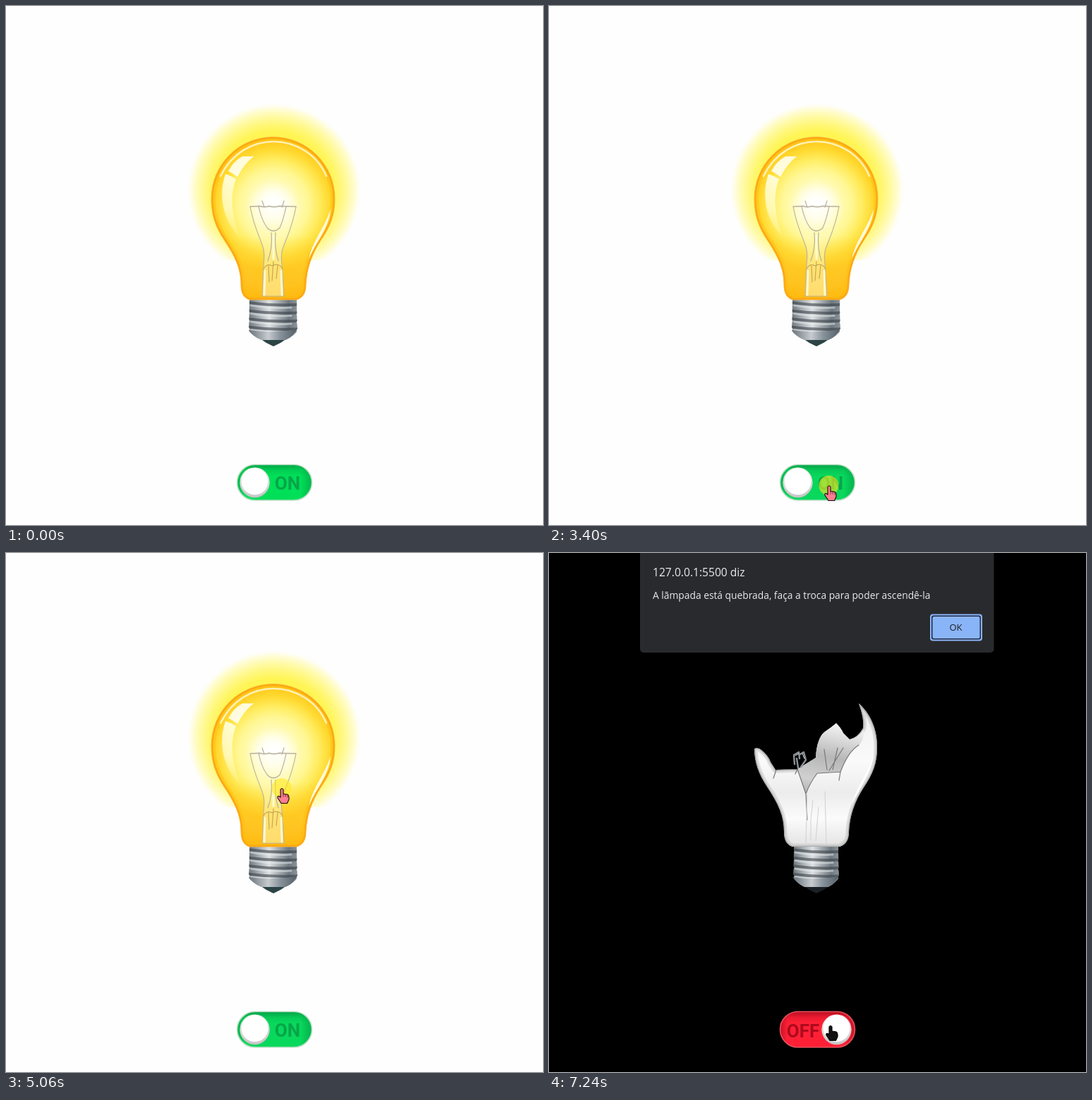
These frames come from a looping animation (761 by 735 pixels, 8000 ms). An HTML page with a canvas:

```html
<!DOCTYPE html>
<html lang="pt">
<head>
<meta charset="utf-8">
<title>Lâmpada</title>
<style>
html, body { margin: 0; width: 100%; height: 100%; overflow: hidden; background: #fefefe; }
canvas { display: block; }
</style>
</head>
<body>
<canvas id="stage" width="761" height="735"></canvas>
<script>
const ctx = document.getElementById('stage').getContext('2d');
const LOOP = 8000;
const start = performance.now();

const neck = 'C333 372 325 355 309 331 C297 313 291 296 291 273';
const foot = 'C425 406 421 413 412 416 L345 416 C336 413 333 405 333 395';
const glass = new Path2D(`M333 395 ${neck} A87.5 87.5 0 0 1 466 273 C466 297 459 313 446 332 C433 352 426 372 425 395 ${foot} Z`);
const shard = new Path2D('M333 395 C333 372 325 355 309 331 C297 313 291 296 291 277 Q297 275 301 279 Q311 287 314 296 L321 307 L352 306 L378 290 C379 270 384 258 391 253 Q400 247 407 241 Q414 248 417 255 L426 264 Q438 261 445 248 Q447 235 439 213 C455 227 466 250 465 277 C465 297 459 313 446 332 C433 352 426 372 425 395 ' + foot + ' Z');
const backWall = new Path2D('M352 306 L378 290 C379 270 384 258 391 253 Q400 247 407 241 Q414 248 417 255 L426 264 Q438 262 446 250 Q447 265 439 272 Q424 281 413 310 L380 312 Q370 325 364 341 Z');
const cracks = new Path2D('M321 307 L352 306 L364 341 Q370 325 380 312 L413 310 Q424 281 439 272 M364 341 L366 378 M352 306 L349 313 M322 307 L318 319 M413 310 L411 322 M390 278 L394 307 M409 276 L402 307 M417 276 L397 308');
const hand = new Path2D('M-2 2 Q0 -1 2 2 L2 8 L8 9 Q10 10 10 13 L10 16 L7.5 21.5 L-1 21.5 L-6 14 Q-7 10 -3 12 L-2 13 Z');
const arrow = new Path2D('M0 0 L0 16 L4 12.5 L6.5 18.5 L9 17.5 L6.5 11.5 L11.5 11.5 Z');
const stem = new Path2D('M346 284 C351 312 360 328 364 341 Q367 350 365 366 L363 411 L394 411 L391 366 Q389 350 393 341 C398 328 406 312 411 284 Z');
const wires = new Path2D('M346 284 L360 283 Q366 287 373 283 Q380 287 387 283 L411 284 M358 284 Q362 303 370 314 Q379 323 388 314 Q393 303 397 284 M363 276 L366 285 M394 276 L391 285 M376 321 Q378 343 371 361 M382 321 Q380 343 386 361');
const posts = new Path2D('M365 372 Q370 364 377 368 Q386 363 392 372 M372 368 L373 391 M379 362 L377 389 M385 367 L383 386');

function fill(shape, style) { ctx.fillStyle = style; ctx.fill(shape); }
function line(shape, style, width) {
  ctx.strokeStyle = style;
  ctx.lineWidth = width;
  ctx.stroke(shape);
}
function blend(g, stops) {
  for (const [at, color] of stops) g.addColorStop(at, color);
  return g;
}
const radial = (x, y, r, stops) => blend(ctx.createRadialGradient(x, y, 0, x, y, r), stops);
const linear = (x0, y0, x1, y1, stops) => blend(ctx.createLinearGradient(x0, y0, x1, y1), stops);
function box(x, y, w, h, r) {
  const p = new Path2D();
  p.roundRect(x, y, w, h, r);
  return p;
}
function disc(x, y, r) {
  const p = new Path2D();
  p.arc(x, y, r, 0, 7);
  return p;
}
function text(s, x, y, font, color, align = 'left') {
  ctx.font = font;
  ctx.fillStyle = color;
  ctx.textAlign = align;
  ctx.fillText(s, x, y);
}

function drawBase(on) {
  const l = on ? 344 : 346, r = on ? 413 : 411;
  const body = new Path2D(`M${l + 1} 415 L${r - 1} 415 L${r} 460 Q${r - 4} 467 396 473 L362 473 Q${l + 4} 467 ${l} 460 Z`);
  fill(new Path2D('M360 471 L398 471 Q389 478 379 482 Q369 478 360 471 Z'), on ? '#2c4446' : '#1b2024');
  ctx.save();
  ctx.clip(body);
  fill(body, linear(l, 0, r, 0, [[0, '#6f777d'], [.2, '#a5abb0'], [.42, '#dfe2e4'], [.6, '#a9b0b5'], [.82, '#6f787f'], [1, '#8c959b']]));
  for (let i = 0; i < 4; i++) {
    const y = 419 + i * 11.5;
    line(new Path2D(`M${l - 2} ${y + 1} Q379 ${y + 6} ${r + 2} ${y + 4}`), 'rgba(58,66,73,.6)', 4);
    line(new Path2D(`M${l + 3} ${y + 5} Q376 ${y + 10} ${r - 9} ${y + 8}`), 'rgba(236,239,241,.5)', 3);
  }
  fill(new Path2D(`M${l} 459 Q379 464 ${r} 458 L398 475 L360 475 Z`), linear(l, 0, r, 0, [[0, '#68727a'], [.4, '#c6cbcf'], [.65, '#87919a'], [1, '#515d66']]));
  ctx.restore();
  // thread notches along both sides
  for (let i = 0; i < 4; i++) {
    const y = 424 + i * 11.5, bg = on ? '#fefefe' : '#000';
    fill(disc(l - 1, y - 1, 2.2), bg);
    fill(disc(r + 1, y + 1, 2.2), bg);
  }
}

function drawHighlights(on) {
  line(new Path2D('M304 241 C320 208 350 192 379 192 C411 192 441 210 454 241'), on ? 'rgba(255,248,205,.85)' : 'rgba(255,255,255,.9)', 2.4);
  fill(new Path2D('M315 234 Q322 220 335 213 L351 213 Q337 224 328 242 Q320 236 315 234 Z'), on ? 'rgba(255,255,244,.88)' : 'rgba(255,255,255,.92)');
  fill(new Path2D('M311 238 Q318 240 326 245 C316 270 321 301 331 326 C311 309 299 272 311 238 Z'), on
    ? linear(0, 238, 0, 326, [[0, 'rgba(255,255,230,.9)'], [.55, 'rgba(255,253,205,.75)'], [1, 'rgba(255,248,170,.3)']])
    : 'rgba(255,255,255,.9)');
  fill(new Path2D('M460 287 C459 313 439 335 429 358 C435 331 453 312 460 287 Z'), 'rgba(255,255,235,.9)');
}

function drawBulb(on) {
  if (on) {
    ctx.fillStyle = radial(380, 261, 125, [[0, '#fff23a'], [.66, '#fff554'], [.75, '#fff778'], [.84, '#fffaa6'], [.93, '#fffddc'], [1, 'rgba(254,254,254,0)']]);
    ctx.fillRect(255, 135, 250, 225);
  }
  drawBase(on);
  ctx.save();
  ctx.clip(glass);
  fill(glass, on
    ? radial(379, 282, 142, [[0, '#ffffff'], [.09, '#fffff0'], [.2, '#fffcc0'], [.35, '#fff794'], [.46, '#ffec5e'], [.56, '#ffd930'], [.65, '#ffc81a'], [.8, '#ffc62a'], [1, '#ffb90e']])
    : radial(379, 275, 142, [[0, '#ffffff'], [.32, '#fdfdfd'], [.5, '#f0f0f0'], [.61, '#dedede'], [.75, '#ededed'], [1, '#e1e1e1']]));
  ctx.fillStyle = on
    ? linear(0, 325, 0, 416, [[0, 'rgba(255,214,40,0)'], [.35, 'rgba(255,210,50,.5)'], [.65, 'rgba(255,196,30,.55)'], [1, 'rgba(255,184,10,.6)']])
    : linear(0, 330, 0, 416, [[0, 'rgba(200,200,200,0)'], [.25, 'rgba(190,190,190,.28)'], [.55, 'rgba(255,255,255,.45)'], [1, 'rgba(220,220,220,.3)']]);
  ctx.fillRect(285, 325, 190, 91);
  line(glass, on ? 'rgba(255,184,10,.4)' : 'rgba(205,205,205,.6)', on ? 12 : 15);
  line(glass, on ? '#fda813' : '#b5b5b5', on ? 5 : 4);
  drawHighlights(on);
  fill(stem, on ? 'rgba(255,252,196,.5)' : 'rgba(255,255,255,.5)');
  if (on) fill(disc(379, 284, 38), radial(379, 284, 38, [[0, 'rgba(255,255,255,.9)'], [.5, 'rgba(255,255,255,.5)'], [1, 'rgba(255,255,255,0)']]));
  line(stem, on ? '#bdb49a' : '#a7a9aa', 1.2);
  line(wires, on ? '#b5afa0' : '#a7a9aa', 1.2);
  line(posts, on ? '#c9a651' : '#a5a5a5', 1.2);
  if (on) line(new Path2D('M367 375 L366 409 M390 375 L391 409 M379 325 L379 358'), 'rgba(255,255,225,.8)', 3);
  ctx.restore();
  if (on) line(glass, '#f9b334', .8);
}

function drawBroken() {
  drawBase(false);
  ctx.save();
  ctx.clip(shard);
  fill(shard, linear(0, 215, 0, 416, [[0, '#eeeeee'], [.4, '#fafafa'], [.62, '#ececec'], [.8, '#fbfbfb'], [1, '#e3e3e3']]));
  line(shard, 'rgba(195,195,195,.5)', 9);
  line(shard, '#b0b0b0', 3);
  fill(backWall, linear(390, 242, 370, 340, [[0, '#f0f0f0'], [.45, '#b7b7b7'], [.8, '#d0d0d0'], [1, '#b4b4b4']]));
  fill(new Path2D('M460 285 C458 312 438 335 429 358 C435 331 453 312 460 285 Z'), '#fff');
  line(cracks, '#777', 1.2);
  line(new Path2D('M366 342 L364 411 M391 338 L393 411 M374 350 L371 378 L371 407 M382 360 L378 407'), '#d0d0d0', 1);
  ctx.restore();
  line(new Path2D('M348 299 L347 286 L354 282 L355 291 M356 285 L361 282 L364 293 L357 303 M351 291 L353 304'), '#8d9196', 2.4);
  line(new Path2D('M349 287 L354 284 M359 284 L362 291'), '#dadde0', 1);
}

function drawToggle(on, hover) {
  const pill = box(327.5, 649.5, 106, 50.5, 25.2);
  ctx.save();
  ctx.clip(pill);
  fill(pill, on ? (hover ? '#08d85c' : '#00df58') : '#ff2036');
  const edge = on ? '0,120,55,' : '130,0,20,';
  ctx.fillStyle = linear(0, 650, 0, 700, [[0, `rgba(${edge}.55)`], [.16, `rgba(${edge}.15)`], [.32, `rgba(${edge}0)`], [1, `rgba(${edge}0)`]]);
  ctx.fillRect(327, 649, 107, 52);
  ctx.fillStyle = linear(328, 0, 433, 0, [[0, `rgba(${edge}.4)`], [.1, `rgba(${edge}0)`], [.85, `rgba(${edge}0)`], [1, `rgba(${edge}.4)`]]);
  ctx.fillRect(327, 649, 107, 52);
  ctx.restore();
  line(pill, on ? '#bfe0c8' : '#e4515b', 1.6);
  const font = '700 26px Roboto, "Open Sans", sans-serif';
  if (on) text('ON', 399, 685, font, '#08a449', 'center');
  else text('OFF', 360, 685.5, font, '#ae0a1d', 'center');

  const x = on ? 352.5 : 407.5;
  fill(disc(x, 675.5, 21), on ? '#9fc3aa' : '#d5a7ac');
  fill(disc(x, 674.5, 21), linear(0, 654, 0, 696, [[0, '#f0f0f0'], [1, '#c8c8c8']]));
  fill(disc(x, 673.5, 18.8), '#fff');
}

function drawSwapButton() {
  fill(box(305, 57, 150, 41.5, 6), '#0d6efd');
  text('Trocar lâmpada', 380, 84, '16.4px "Open Sans", "Noto Sans", sans-serif', '#fff', 'center');
}

function drawDialog(alpha) {
  const face = '"Open Sans", "Noto Sans", sans-serif';
  ctx.save();
  ctx.globalAlpha = alpha;
  fill(box(129, -8, 501.5, 149, 5), '#292a2d');
  text('127.0.0.1:5500 diz', 147, 33, `15.6px ${face}`, '#e8eaed');
  text('A lãmpada está quebrada, faça a troca para poder ascendê-la', 147, 64.5, `13.8px ${face}`, '#e8eaed');
  fill(box(540, 86.5, 74, 38, 4), '#8ab4f8');
  fill(box(542, 88.5, 70, 34, 3), '#202b40');
  fill(box(543.5, 90, 67, 31, 2), '#8ab4f8');
  text('OK', 576.5, 110, `13px ${face}`, '#202124', 'center');
  ctx.restore();
}

const ease = p => p * p * (3 - 2 * p);
const switchSpot = [397, 679], bulbSpot = [391, 333], lastSpot = [399, 669];
const moves = [
  { at: 850, every: 70, steps: 5, lead: 0, from: [513, 721], to: switchSpot },
  { at: 4260, every: 67, steps: 8, lead: 1, from: switchSpot, to: bulbSpot },
  { at: 6130, every: 70, steps: 11, lead: 1, from: bulbSpot, to: lastSpot }
];

function cursorAt(t) {
  const m = moves.filter(v => t >= v.at).pop();
  if (!m) return null;
  const k = Math.min(1, (Math.floor((t - m.at) / m.every) + m.lead) / m.steps);
  return m.from.map((v, i) => v + (m.to[i] - v) * ease(k));
}

const within = (t, spans) => spans.some(([a, b]) => t >= a && t < b);
const lit = [[0, 1730], [2670, 3530], [4200, 5120]];
const clicks = [[1600, 1730], [2540, 2670], [3400, 3530], [4130, 4200], [4930, 4990], [5060, 5120], [6960, 7030]];

function drawCursor(t, on) {
  const spot = cursorAt(t);
  if (!spot) return;
  const [x, y] = spot;
  if (within(t, clicks)) fill(disc(x - .5, y, 14), 'rgba(255,232,30,.6)');
  const overSwitch = x > 327 && x < 434 && y > 649 && y < 701;
  const overBulb = x > 255 && x < 505 && y > 135 && y < 487;
  const shape = overSwitch || overBulb ? hand : arrow;
  ctx.save();
  ctx.translate(x, y);
  if (on) {
    fill(shape, '#fb7d90');
    line(shape, '#150a0c', 1.1);
    if (shape === hand) line(new Path2D('M2 8 V12 M5 9 V12 M8 10 V13'), '#4b2028', .8);
  } else {
    const plain = t >= 5120;
    fill(shape, plain ? '#111' : linear(0, 0, 0, 22, [[0, '#292c20'], [.6, '#303936'], [.75, '#a3dede'], [1, '#a3dede']]));
    line(shape, '#080808', 1.2);
  }
  ctx.restore();
}

function draw() {
  const t = (performance.now() - start) % LOOP;
  const on = within(t, lit), broken = t >= 5120;
  ctx.lineJoin = ctx.lineCap = 'round';
  ctx.fillStyle = on ? '#fefefe' : '#000';
  ctx.fillRect(0, 0, 761, 735);
  if (broken) {
    drawBroken();
    drawSwapButton();
  } else {
    drawBulb(on);
  }
  drawToggle(on, t >= 1200);
  if (t >= 7100) drawDialog(Math.min(1, (Math.floor((t - 7100) / 70) + 1) / 3));
  drawCursor(t, on);
  requestAnimationFrame(draw);
}
draw();
</script>
</body>
</html>
```
